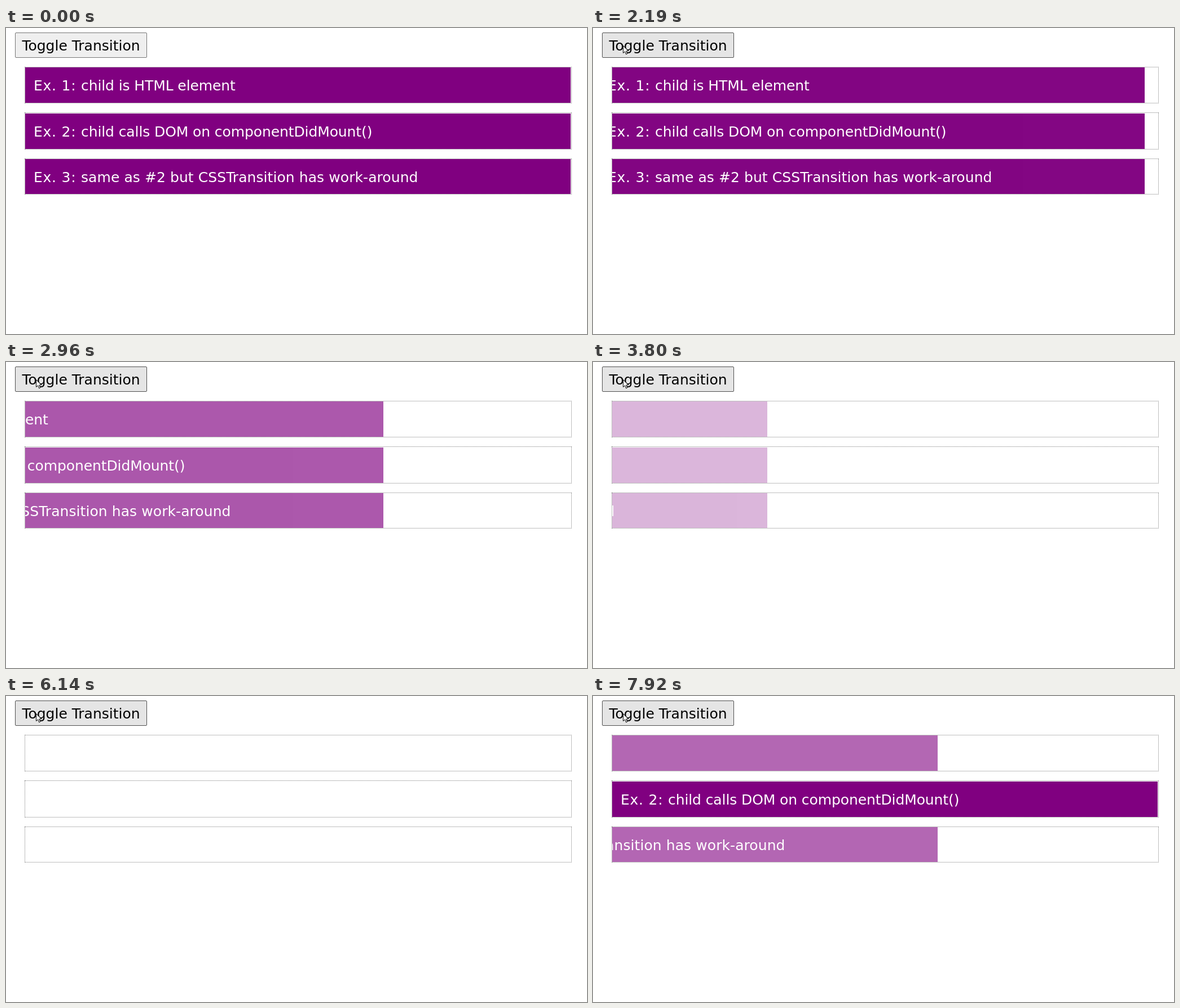
Write an HTML page that moves like this. It is 1030x544 px and loops after 7990 ms.

```html
<!DOCTYPE html>
<html lang="en">
<head>
<meta charset="utf-8">
<title>Toggle Transition</title>
<style>
  html, body { margin: 0; width: 100%; height: 100%; overflow: hidden; background: #fff; }
  body { position: relative; font: 25px "DejaVu Sans", sans-serif; white-space: pre; }
  button, .box, .bar, #cursor { position: absolute; box-sizing: border-box; }
  button {
    left: 16px; top: 8px; width: 234px; height: 45px; padding: 0;
    border: 1px solid #767676; border-radius: 2px; background: #efefef;
    color: #000; font: inherit; line-height: 45px; text-align: center;
  }
  button.hover { background: #e5e5e5; border-color: #4f4f4f; }
  button.active { background: #f5f5f5; border-color: #8d8d8d; }
  .box { left: 33px; width: 970px; border: 1px dotted #808080; overflow: hidden; }
  .bar {
    left: 0; width: 967px; height: 63px; padding-left: 15px;
    background: purple; color: #fff; line-height: 65px;
  }
  .bar span { letter-spacing: .03em; }
  #cursor { left: 0; top: 0; }
</style>
</head>
<body>
<button>Toggle Transition</button>
<svg id="cursor" width="12" height="18">
  <path d="M.5 .5V13.5L3.5 10.8L5.6 15.8L7.8 14.8L5.7 10H9.7Z" fill="#fff" stroke="#000"/>
</svg>
<script>
const LOOP = 7990, WIDTH = 967;
const button = document.querySelector('button');
const cursor = document.getElementById('cursor');

// top, height, gap above the bar, letter spacing, text
const bars = [
  [69, 65, 0, -.004, 'child is HTML element'],
  [150, 66, 1, -.004, 'child calls DOM on componentDidMount()'],
  [232, 64, 0, .003, 'same as #2 but CSSTransition has work-around'],
].map(([top, height, gap, spacing, text], i) => {
  const box = document.createElement('div');
  box.className = 'box';
  box.style.cssText = `top:${top}px;height:${height}px`;
  box.innerHTML = `<div class="bar" style="top:${gap}px;letter-spacing:${spacing}em">` +
    `<span>Ex. ${i + 1}: </span>${text}</div>`;
  document.body.insertBefore(box, cursor);
  return box.firstChild;
});

// [time, elapsed share of the transition]
const exitClock = [[2037, 0], [2190, .0398], [2960, .2225], [3800, .4268], [4900, .6935]];
const enterClock = [[6520, 0], [6890, .0913], [7920, .3454]];
// [time, x, y]
const fastPath = [[170, 863, 519], [300, 177, 328]];
const slowPath = [[640, 13, 185], [900, 74, 54], [1110, 74, 54], [1320, 53, 31]];

// Linear interpolation through rows of [time, ...values]
function along(keys, t) {
  if (t <= keys[0][0]) return keys[0].slice(1);
  const n = keys.findIndex(k => k[0] > t);
  if (n < 0) return keys[keys.length - 1].slice(1);
  const [a, b] = [keys[n - 1], keys[n]];
  const u = (t - a[0]) / (b[0] - a[0]);
  return a.slice(1).map((v, i) => v + (b[i + 1] - v) * u);
}

// CSS "ease": cubic-bezier(.25, .1, .25, 1)
function ease(x) {
  let lo = 0, hi = 1, s;
  for (let i = 0; i < 24; i++) {
    s = (lo + hi) / 2;
    if (.75 * s * (1 - s) + s ** 3 < x) lo = s; else hi = s;
  }
  return .3 * s * (1 - s) ** 2 + 3 * s * s * (1 - s) + s ** 3;
}

const snap = (t, start, step) => start + Math.floor((t - start) / step + .05) * step;
const within = (t, from, to) => t >= from && t < to;

// Share of a bar that is in view
function visible(t, index) {
  if (t < 6140) return 1 - ease(along(exitClock, snap(t, 2190, 69.5))[0]);
  if (index === 1) return t < 6540 ? 0 : 1;
  return t < 6890 ? 0 : ease(along(enterClock, snap(t, 6890, 68.67))[0]);
}

function draw(t) {
  bars.forEach((bar, i) => {
    const share = visible(t, i);
    bar.style.opacity = share;
    bar.style.transform = `translateX(${Math.round((share - 1) * WIDTH)}px)`;
  });

  const pressed = within(t, 1850, 1990) || within(t, 6400, 6470);
  button.className = pressed ? 'active' : t >= 1180 ? 'hover' : '';

  const shown = within(t, 170, 370) || t >= 640;
  const [x, y] = t < 370
    ? along(fastPath, snap(t, 170, 65))
    : along(slowPath, t < 1110 ? snap(t, 640, 65) : snap(t, 1110, 70));
  cursor.style.display = shown ? '' : 'none';
  cursor.style.transform = `translate(${Math.round(x)}px, ${Math.round(y)}px)`;
}

const start = performance.now();
function tick() {
  draw((performance.now() - start) % LOOP);
  requestAnimationFrame(tick);
}
tick();
</script>
</body>
</html>
```
